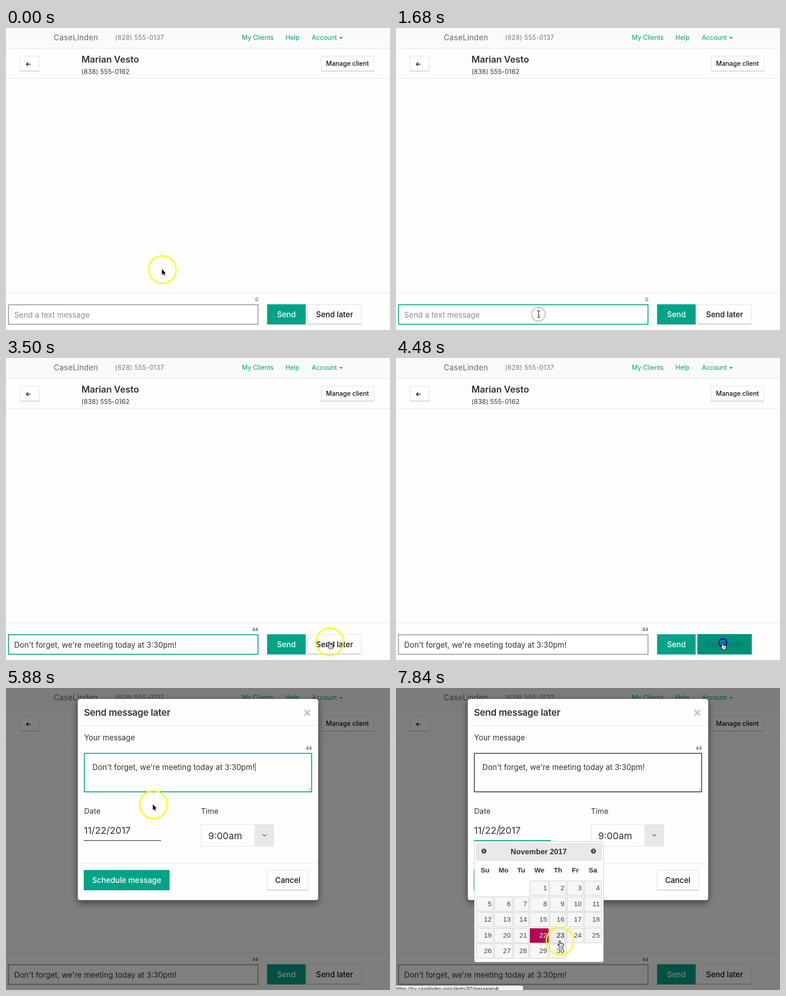
These frames come from a looping animation (845x663 px, 8 s). An HTML page with a canvas:

```html
<!DOCTYPE html>
<html lang="en">
<head>
<meta charset="utf-8">
<title>Schedule a message</title>
<style>
html, body { margin: 0; width: 100%; height: 100%; overflow: hidden; background: #fefefe; }
canvas { display: block; width: 845px; height: 663px; }
</style>
</head>
<body>
<canvas id="stage" width="845" height="663"></canvas>
<script>
const ctx = document.getElementById('stage').getContext('2d');
const LOOP = 8000, STEP = 140, LAST = 56;
const TEAL = '#00a388', LINK = '#009b80', INK = '#333', RULE = '#e4e2dc';
const UI = 'Inter, Roboto, sans-serif', ARIAL = '"Liberation Sans", Arial, sans-serif';
const MESSAGE = "Don't forget, we're meeting today at 3:30pm!";

// Moments at which the interface changes
const FOCUS = 1260, TYPED = 2240, PRESS = 4480, OPEN = 4620, PICK = 6720;

// time, x, y, easing of the way there
const PATH = [
  [140, 344.2, 530.5], [980, 313.5, 628.5, 'both'], [2520, 313.5, 628.5],
  [2940, 549, 582.5, 'in'], [3640, 719, 625, 'out'], [4900, 719, 625],
  [5880, 324.3, 256.5, 'both'], [6440, 229, 313, 'both'], [7000, 229, 313],
  [7840, 361, 555.5, 'out']
];
// time, radius, blueness, opacity
const RING = [
  [980, 30.2, 0, 1], [1120, 21, .5, .8], [1260, 8.5, 1, 1], [1540, 8.5, 1, 1],
  [1680, 15, .55, .36], [1960, 20, .5, 0], [2520, 30.2, 0, 0], [2660, 30.2, 0, 1],
  [4340, 30.2, 0, 1], [4480, 8.5, 1, 1], [4620, 8.5, 1, 1], [4760, 18, .5, .7],
  [4900, 30.2, 0, 1], [6440, 30.2, 0, 1], [6580, 18, .5, .8], [6720, 8.5, 1, 1],
  [6860, 12.5, .6, .55], [7000, 21, .4, .7], [7140, 30.2, 0, 1]
];
const EASE = {
  in: u => u * u,
  out: u => u * (2 - u),
  both: u => u * u * (3 - 2 * u)
};

const clamp = u => Math.max(0, Math.min(1, u));
const between = (t, a, b) => t >= a && t < b;
const inside = (p, x, y, w, h) => between(p.x, x, x + w) && between(p.y, y, y + h);

function sample(keys, t) {
  let i = 1;
  while (i < keys.length - 1 && t > keys[i][0]) i++;
  const a = keys[i - 1], b = keys[i];
  const ease = EASE[b.at(-1)] || (u => u);
  const k = ease(clamp((t - a[0]) / (b[0] - a[0])));
  return a.slice(1).map((v, j) => v + (b[j + 1] - v) * k);
}

function rect(x, y, w, h, color) {
  ctx.fillStyle = color;
  ctx.fillRect(x, y, w, h);
}

function box(x, y, w, h, fill, stroke, lw = 1, radius = 0) {
  ctx.beginPath();
  ctx.roundRect(x + lw / 2, y + lw / 2, w - lw, h - lw, radius);
  ctx.fillStyle = fill;
  ctx.fill();
  ctx.strokeStyle = stroke;
  ctx.lineWidth = lw;
  ctx.stroke();
}

function line(color, lw, ...pts) {
  ctx.beginPath();
  for (let i = 0; i < pts.length; i += 2) ctx.lineTo(pts[i], pts[i + 1]);
  ctx.strokeStyle = color;
  ctx.lineWidth = lw;
  ctx.stroke();
}

function text(str, x, y, size, color, { weight = 400, align = 'left', gap = 0, font = UI } = {}) {
  ctx.font = `${weight} ${size}px ${font}`;
  ctx.letterSpacing = gap + 'px';
  ctx.textAlign = align;
  ctx.fillStyle = color;
  ctx.fillText(str, x, y);
}

function button(label, x, y, w, h, size, baseline) {
  box(x, y, w, h, '#fff', '#dcdcdc');
  rect(x, y + h - 1, w, 1, '#a9a9a9');
  text(label, x + w / 2, baseline, size, '#111', { weight: 500, align: 'center' });
}

function solidButton(label, x, y, w, h, baseline) {
  rect(x, y, w, h, TEAL);
  rect(x, y + h - 1, w, 1, '#008c75');
  text(label, x + w / 2, baseline, 16.8, '#fff', { weight: 500, align: 'center' });
}

function page(t) {
  rect(0, 0, 845, 663, '#fefefe');
  rect(0, 0, 845, 44, '#fafafa');
  for (const y of [44, 110, 581]) rect(0, y, 845, 1, RULE);

  text('CaseLinden', 105, 27, 16.8, '#666', { gap: .4 });
  text('(628) 555-0137', 240, 26, 14, '#777', { gap: .4 });
  text('My Clients', 519, 26, 14, LINK);
  text('Help', 615, 26, 14, LINK);
  text('Account', 673, 26, 14, LINK);
  ctx.beginPath();
  ctx.moveTo(733.5, 20);
  ctx.lineTo(741, 20);
  ctx.lineTo(737.2, 24);
  ctx.fill();

  button('', 30.5, 61.5, 43, 33.5, 14, 83);
  line('#111', 1.6, 54, 79.5, 45, 79.5);
  line('#111', 1.6, 48.8, 75.5, 44.8, 79.5, 48.8, 83.5);
  text('Marian Vesto', 166, 76, 20.3, INK, { weight: 600, gap: -.2 });
  text('(838) 555-0162', 166, 101, 14, INK, { gap: .2 });
  button('Manage client', 693, 61.5, 117, 33.5, 14, 83);

  const typed = t >= TYPED;
  box(4.5, 606.5, 551, 45, '#fff', between(t, FOCUS, PRESS) ? TEAL : '#9b9b9b', 2);
  text(typed ? MESSAGE : 'Send a text message', 18, 635.5, 16.85, typed ? INK : '#8c8c8c');
  text(typed ? '44' : '0', 555, 600, 10.5, INK, { align: 'right' });
  if (between(t, TYPED, 2660) || between(t, 3780, 4200)) rect(376, 620, 1, 19, '#222');

  solidButton('Send', 574.5, 606.5, 85, 44, 635);
  if (between(t, PRESS, OPEN + STEP)) {
    box(663, 606, 120, 45, '#009079', '#14a08a');
    const label = t < OPEN ? 'rgba(0,112,92,.55)' : '#fff';
    text('Send later', 723, 635, 16.8, label, { weight: 500, align: 'center' });
  } else {
    button('Send later', 663.5, 606.5, 119, 44, 16.8, 635);
  }
}

function modal(t) {
  const shown = clamp((t - OPEN + 60) / 300);
  rect(0, 0, 845, 663, `rgba(0,0,0,${.5 * clamp((t - OPEN + 60) / 150)})`);
  ctx.save();
  ctx.globalAlpha = shown;
  ctx.translate(0, -110 * (1 - EASE.out(shown)));

  ctx.save();
  ctx.shadowColor = 'rgba(0,0,0,.55)';
  ctx.shadowBlur = 15;
  ctx.shadowOffsetY = 5;
  ctx.beginPath();
  ctx.roundRect(158, 24, 529, 442, 5);
  ctx.fillStyle = '#fefefe';
  ctx.fill();
  ctx.restore();
  line('rgba(0,0,0,.25)', 1, 162, 465.5, 683, 465.5);
  rect(158, 82, 529, 1, '#e5e5e5');
  rect(158, 385, 529, 1, '#e5e5e5');

  text('Send message later', 171.5, 61, 20.5, INK, { weight: 600, gap: -.3 });
  line('#c2c2c2', 3.4, 657, 48.5, 669, 60.5);
  line('#c2c2c2', 3.4, 669, 48.5, 657, 60.5);

  const picking = t >= PICK;
  text('Your message', 172, 115, 16.6, INK);
  text('44', 673, 136, 10.5, INK, { align: 'right' });
  box(171.5, 142.5, 502, 86.5, '#fefefe', picking ? '#484848' : TEAL, 2);
  line('#888', 1, 664, 226.5, 671, 219.5);
  line('#888', 1, 668, 226.5, 671, 223.5);
  text(MESSAGE, 190, 179.5, 16.85, INK);
  if (!picking && !between(t, 6020, 6440) && t >= 4760) rect(548, 164, 1, 19, '#222');

  text('Date', 172, 276, 16.5, INK);
  text('11/22/2017', 171.5, 319.5, 20.7, INK);
  rect(171, 334, 170, picking ? 2 : 1.5, picking ? TEAL : '#444');
  if (between(t, 6860, 7280) || t >= 7700) rect(228, 300, 1, 24, '#222');

  text('Time', 429, 276, 16.4, INK);
  box(429, 299, 161, 49, '#fefefe', '#dedede');
  rect(547, 299, 43, 49, '#e8e8e8');
  line(LINK, 1.7, 564, 321, 568.5, 325.2, 573, 321);
  text('9:00am', 445, 332, 20.7, INK);

  solidButton('Schedule message', 171, 399.5, 189, 44.5, 428);
  button('Cancel', 574, 399.5, 92, 44.5, 16.8, 428);
  ctx.restore();
}

const COLS = [177, 216, 258, 294, 338, 376, 414, 454];
const FIRST = 3;
const cell = day => {
  const n = day + FIRST - 1, c = n % 7;
  return [COLS[c], Math.round(423.4 + 34.4 * Math.floor(n / 7)), COLS[c + 1] - COLS[c] - 1.5, 33];
};

function hoveredDay(t, p) {
  if (t < PICK) return 0;
  for (let d = 1; d <= 30; d++) if (inside(p, ...cell(d))) return d;
  return 0;
}

function calendarArrow(x, dir) {
  ctx.beginPath();
  ctx.arc(x, 358, 5.6, 0, 7);
  ctx.fillStyle = '#444';
  ctx.fill();
  line('#eee', 1.6, x - dir, 355.5, x + 1.5 * dir, 358, x - dir, 360.5);
}

function calendar(hover) {
  box(172, 337, 285, 265, '#fff', '#c5c5c5', 1, 3);
  box(176, 341, 277, 38, '#e9e9e9', '#d8d8d8', 1, 3);
  const bold = { weight: 700, align: 'center', font: ARIAL };
  text('November 2017', 314, 365, 16.7, INK, bold);
  calendarArrow(193.5, -1);
  calendarArrow(434.5, 1);
  ['Su', 'Mo', 'Tu', 'We', 'Th', 'Fr', 'Sa'].forEach((name, i) =>
    text(name, (COLS[i] + COLS[i + 1]) / 2 - .5, 405, 15, INK, bold));
  for (let d = 1; d <= 30; d++) {
    const [x, y, w, h] = cell(d);
    const today = d === 22, over = d === hover;
    box(x, y, w, h, today ? '#b5005b' : over ? '#ededed' : '#f6f6f6', today ? '#b79a52' : '#c8c8c8');
    text(d, x + w - 4, y + 20.5, 15.3, today ? '#fff' : over ? '#1c1c1c' : '#454545',
      { align: 'right', font: ARIAL });
  }
}

function statusBar() {
  box(-2, 653, 282, 14, '#f3f3f3', '#b5b5b5', 1, 3);
  text('https://try.caselinden.org/clients/97/messages#', -1, 664, 10, '#222');
}

const ARROW = new Path2D('M0 0V12.2L2.8 9.6L4.7 14L6.8 13.1L4.9 8.8H8.8Z');
const HAND = new Path2D('M-2 1Q-.8 -.8 .6 1L1 6Q2.4 4.8 3.2 6.4Q4.8 5.4 5.4 7Q7.4 6.4 7.8 8.6' +
  'Q8 11 6.6 13L6.4 15H-.6L-1.4 13L-4.8 9.2Q-5.2 7.2 -3.2 7.8L-1.6 9.2Z');

function pointerShape(t, p, hover) {
  if (t < OPEN) {
    if (inside(p, 5, 607, 550, 44)) return 'beam';
    return inside(p, 575, 607, 84, 43) || inside(p, 664, 607, 118, 43) ? 'hand' : 'arrow';
  }
  if (hover) return 'hand';
  return inside(p, 172, 143, 501, 86) || inside(p, 172, 296, 169, 40) ? 'beam' : 'arrow';
}

function pointer(t, p, shape) {
  const [radius, blue, alpha] = sample(RING, t);
  if (alpha > 0) {
    const warm = Math.round(252 * (1 - blue)), cool = Math.round(20 + 205 * blue);
    ctx.beginPath();
    ctx.arc(p.x, p.y, radius, 0, 7);
    ctx.strokeStyle = `rgba(${warm},${warm},${cool},${alpha})`;
    ctx.lineWidth = 3;
    ctx.stroke();
  }
  if (between(t, TYPED, 2660)) return;

  ctx.save();
  ctx.translate(Math.round(p.x), Math.round(p.y - .5));
  ctx.lineJoin = 'round';
  if (shape === 'beam') {
    for (const [color, lw] of [['rgba(255,255,255,.8)', 3], ['#222', 1.3]]) {
      line(color, lw, 0, -6, 0, 6);
      line(color, lw, -3, -7.5, -1.5, -7.3, 0, -6, 1.5, -7.3, 3, -7.5);
      line(color, lw, -3, 7.5, -1.5, 7.3, 0, 6, 1.5, 7.3, 3, 7.5);
    }
    line('#222', 1, -1.8, 2, 1.8, 2);
  } else if (shape === 'hand') {
    ctx.fillStyle = '#fff';
    ctx.fill(HAND);
    ctx.strokeStyle = '#111';
    ctx.lineWidth = 1.2;
    ctx.stroke(HAND);
    for (const x of [1.2, 3.2, 5.2]) line('#333', .8, x, 9.5, x, 12.5);
  } else {
    ctx.translate(-1, -.5);
    ctx.strokeStyle = '#fff';
    ctx.lineWidth = 2.2;
    ctx.stroke(ARROW);
    ctx.fillStyle = '#000';
    ctx.fill(ARROW);
  }
  ctx.restore();
}

function draw(t) {
  const [x, y] = sample(PATH, t);
  const p = { x, y };
  const hover = hoveredDay(t, p);
  page(t);
  if (t >= OPEN) modal(t);
  if (t >= PICK) calendar(hover);
  if (hover && t >= 7560) statusBar();
  pointer(t, p, pointerShape(t, p, hover));
}

const start = performance.now();
function tick() {
  const ms = Math.max(0, performance.now() - start) % LOOP;
  draw(Math.min(LAST, Math.floor(ms / STEP)) * STEP);
  requestAnimationFrame(tick);
}
tick();
</script>
</body>
</html>
```
